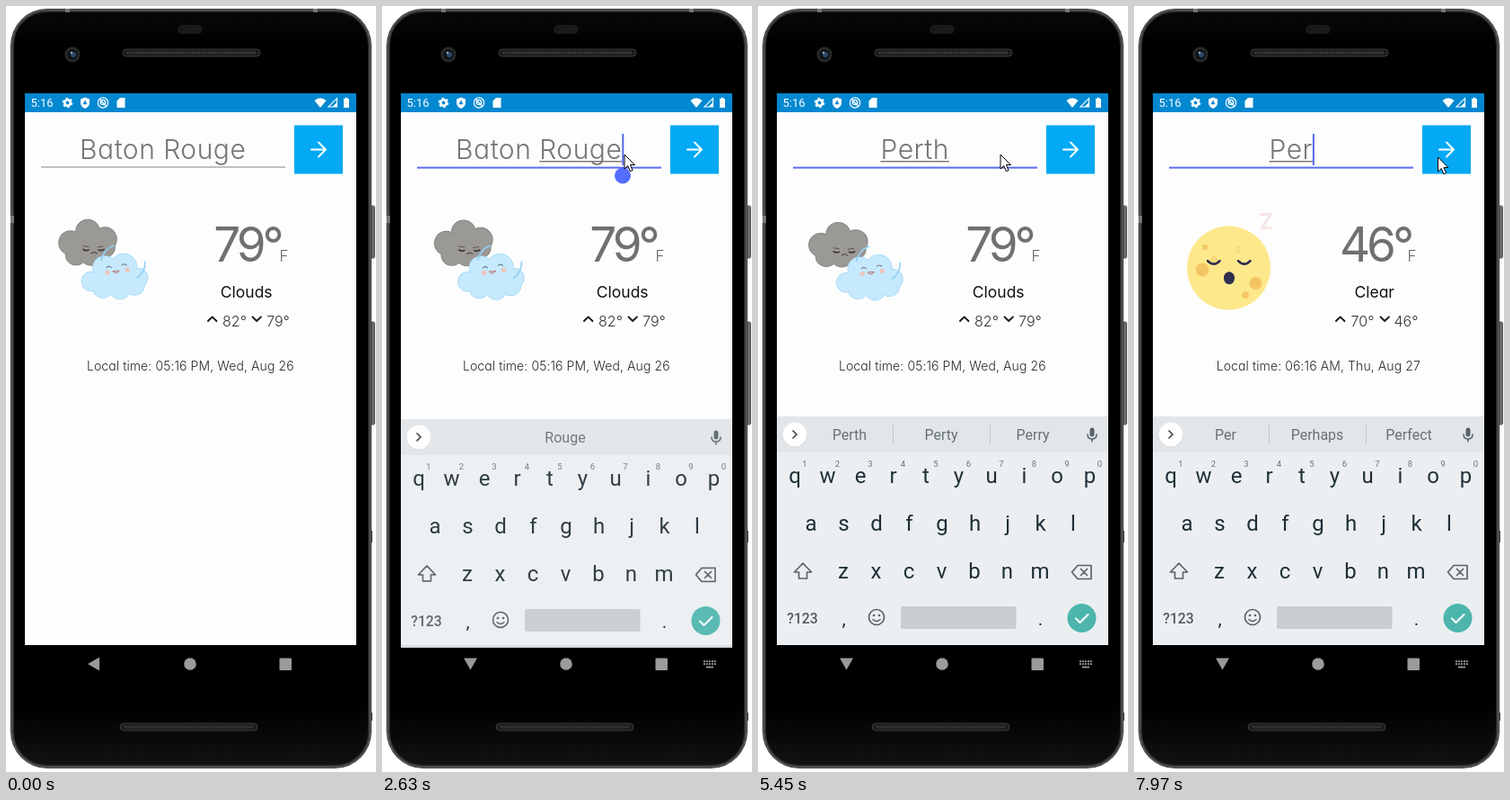
An HTML page for the animation above (7990 ms loop, 412 by 851 pixels).

```html
<!DOCTYPE html>
<html lang="en">
<head>
<meta charset="utf-8">
<title>Weather search</title>
<style>
html, body { margin: 0; width: 100%; height: 100%; overflow: hidden; background: #fff; }
svg { display: block; width: 100%; height: 100%; }
text { font-family: Inter, Lato, sans-serif; font-feature-settings: "cv11"; text-anchor: middle; white-space: pre; }
.kb text, .clock { font-family: Roboto, sans-serif; }
.line { fill: none; stroke-linecap: round; stroke-linejoin: round; }
</style>
</head>
<body>
<svg id="stage" viewBox="0 0 412 851" xmlns="http://www.w3.org/2000/svg"></svg>
<script>
const LOOP = 7990, FOCUS = 2200, WEATHER = 6350;

const text = (x, y, s, size, fill, extra = '') =>
  `<text x="${x}" y="${y}" font-size="${size}" fill="${fill}" ${extra}>${s}</text>`;
const rect = (x, y, w, h, fill, r = 0, extra = '') =>
  `<rect x="${x}" y="${y}" width="${w}" height="${h}" rx="${r}" fill="${fill}" ${extra}/>`;
const circle = (x, y, r, fill, extra = '') =>
  `<circle cx="${x}" cy="${y}" r="${r}" fill="${fill}" ${extra}/>`;
const line = (d, stroke, width = 1.5, extra = '') =>
  `<path class="line" d="${d}" stroke="${stroke}" stroke-width="${width}" ${extra}/>`;
const shape = (d, fill) => `<path d="${d}" fill="${fill}"/>`;

// Puffs are outlined first, then filled, so only the outer edge shows.
const cloud = (puffs, fill, edge) => {
  const all = puffs.map(p => circle(...p, fill)).join('');
  return `<g stroke="${edge}" stroke-width="1.6">${all}</g>${all}`;
};

const grille = (x, y) => rect(x, y, 153, 8, '#1c1c1c', 4, 'stroke="#3c3c3c"') +
  `<path d="M${x + 5} ${y + 4}h143" stroke="#444" stroke-width="3" stroke-dasharray="1 1"/>`;
const sideButton = (y, h) => rect(406, y, 4.5, h, '#6a6c6e', 1.5, 'stroke="#3a3a3a" stroke-width=".8"');

const phone = `
  <defs>
    <linearGradient id="shade" x1="0" x2="0" y1="0" y2="1">
      <stop offset="0" stop-color="#080808"/><stop offset=".04" stop-color="#000"/>
      <stop offset=".92" stop-color="#000"/><stop offset="1" stop-color="#121212"/>
    </linearGradient>
  </defs>
  ${sideButton(222, 58)}${sideButton(351, 114)}
  ${rect(405, 583, 3, 13, '#555')}${rect(405, 785, 3, 9, '#555')}
  ${rect(5, 3, 402, 844, '#2e3032', 41)}
  ${rect(6.5, 4.5, 399, 841, 'none', 39, 'stroke="#6b6e70" stroke-width="1"')}
  ${rect(9, 7, 394, 836, 'url(#shade)', 36)}
  ${rect(5, 233, 4, 8, '#777')}${rect(66, 3, 5, 4, '#777')}${rect(342, 3, 5, 4, '#777')}
  ${rect(191, 21, 28, 10, '#191919', 5)}
  ${grille(130, 48)}${grille(127, 797)}
  ${circle(74, 54, 8.5, '#2b2b2b')}${circle(74, 54, 6, '#11151a')}${circle(75, 54, 3, '#2e4a66')}${circle(73, 52, 1.2, '#8fb0c8')}
  ${rect(21, 97, 369, 21, '#0288d1')}${rect(21, 118, 369, 592, '#fdfdfd')}`;

const status = `
  ${text(40, 112, '5:16', 13, '#fff', 'class="clock"')}
  <g fill="none" stroke="#fff">
    <circle cx="68.5" cy="107.5" r="3.2" stroke-width="2.6"/>
    <circle cx="68.5" cy="107.5" r="4.8" stroke-width="2" stroke-dasharray="2.5 2.5"/>
    <circle cx="108" cy="107.5" r="5.6" stroke-width="1.2"/>
    <circle cx="108" cy="107" r="2.6" stroke-width="1.4"/>
    <path d="M104.5 103.5l7 8" stroke-width="1.2"/>
    <path d="M368.5 102.5v9.5h-9.5z" stroke-width="1.1"/>
  </g>
  ${shape('M88 101.5l5 2v4q0 4-5 6.5q-5-2.5-5-6.5v-4z', '#fff')}
  ${shape('M88 104.5l2.6 4.8h-5.2z', '#0288d1')}
  ${shape('M127 102h5.5v11h-9v-7.5z', '#fff')}
  ${shape('M350 113l-6.5-8q6.5-5.5 13 0z', '#fff')}
  ${shape('M368.5 107v5h-5z', '#fff')}
  ${shape('M376 103h1.7v-1.3h2.6v1.3h1.7v10h-6z', '#fff')}`;

const clouds = `<g id="clouds">
  <g id="gray">
    ${cloud([[72, 263, 13], [91, 250.5, 13], [110, 259, 13], [78, 276, 11.5], [95, 276, 12], [110, 268, 11], [92, 264, 16]], '#9b9996', '#82807d')}
    ${line('M86 266.5l6 1M102 268l6-1', '#5d5653', 1.1)}
    ${line('M86 270.5q3 2 6 .5M103 271q3 1.5 6-.5', '#3d3634', 1.7)}
    ${line('M95 275q3-3 6 0', '#4d4643', 1.2)}
  </g>
  <g id="blue">
    ${cloud([[95, 306, 10.5], [110, 291, 13], [131, 290, 14.5], [147, 302, 10.5], [108, 313, 11], [127, 314.5, 11], [143, 310, 11], [121, 303, 16]], '#c6e9fd', '#a3d9f7')}
    ${line('M106 282q4-13 14-16M146 302q9-6 9-18', '#93d0f4', 1.7)}
    ${circle(113, 296, 2.6, '#f0c3b8')}${circle(135, 293, 2.6, '#f0c3b8')}
    ${line('M112 290.5q2.5-2.5 5 0M129 288q2.5-2.5 5 0', '#6f7d88', 1.1)}
    ${line('M119 295q3.5 4 7-.5z', '#b57268', 1)}
  </g>
</g>`;

const moon = `<g id="moon">
  ${circle(105.5, 291, 46.5, '#fde98c')}
  <g fill-opacity=".85">
    ${circle(76, 293, 7.5, '#f2bf5c')}${circle(135.5, 308, 7, '#f2bf5c')}${circle(124, 321, 4, '#f2bf5c')}
    ${circle(79, 268, 3, '#f2bf5c')}${circle(89, 282, 4, '#f7d375')}
  </g>
  <g id="eyes">${line('M82 283q7 7 13.5 0M116 283q7 7 13.5 0', '#2f2f52', 2.6)}</g>
  <ellipse id="mouth" cx="106" fill="#2f2f52"/>
  ${[0, 1].map(i => text(0, 0, 'Z', 10, '#dc5f63', `id="z${i}" font-weight="700"`)).join('')}
</g>`;

const app = `
  ${text(174.7, 170, '', 30, '#757575', 'id="field" font-weight="300" letter-spacing=".5"')}
  <rect id="word" y="172" height="1.4" fill="#757575"/>
  <rect id="rule" x="39" width="272"/>
  <rect id="caret" y="142" width="2" height="35" fill="#5468ee"/>
  ${circle(268, 188.5, 9, '#536dfe', 'id="handle"')}
  ${rect(321, 132.5, 54, 54, '#03a9f4')}
  ${line('M340 159.5h16M348 151.5l8 8-8 8', '#fff', 2)}
  ${clouds}${moon}
  ${text(268.5, 284, '', 53, '#707070', 'id="temp" font-weight="400" letter-spacing="-4"')}
  ${text(309.5, 284, 'F', 17, '#666', 'font-weight="300"')}
  ${text(267.7, 324, '', 17.5, '#111', 'id="sky" font-weight="400"')}
  ${line('M225 350l4.7-4.7 4.7 4.7M274.5 345.3l4.7 4.7 4.7-4.7', '#111', 1.8)}
  ${text(254.5, 356, '', 16, '#333', 'id="high" font-weight="300"')}
  ${text(303, 356, '', 16, '#333', 'id="low" font-weight="300"')}
  ${text(205.3, 405, '', 14, '#2a2a2a', 'id="local" font-weight="300" letter-spacing=".1"')}`;

const ink = '#1f2f37', soft = '#58646a';
const keyRow = (letters, x, y) => [...letters].map((c, i) =>
  text(x + i * 36.5, y, c, 24, ink, 'class="key"')).join('');

const keyboard = `<g id="kb" class="kb">
  ${rect(21, 456, 369, 254, '#eceff2')}${rect(21, 456, 369, 40, '#e2e6e9')}
  ${circle(41, 476.5, 14, '#d3d7da')}${circle(41, 476, 13.5, '#fff')}
  ${line('M39 472l4 4-4 4', '#444', 1.7)}
  ${[102, 204, 306].map(x => text(x, 482, '', 16, '#667176', 'class="hint"')).join('')}
  <path id="bars" d="M150.5 465v22M258.5 465v22" stroke="#c3c8cb"/>
  ${rect(369.5, 468.5, 5, 10, soft, 2.5)}${line('M367 476q0 5 5 5t5-5M372 481v3', soft)}
  ${keyRow('qwertyuiop', 41, 530)}${keyRow('asdfghjkl', 59, 583)}${keyRow('zxcvbnm', 95, 636)}
  ${[...'1234567890'].map((c, i) => text(52 + i * 36.5, 512, c, 9.5, '#66737a')).join('')}
  ${line('M50 619l9.5 10h-5v7h-9v-7h-5z', soft, 1.7, 'id="shift"')}
  ${line('M356 621.5h15v15h-15l-6.5-7.5zM359.5 625.5l7 7M366.5 625.5l-7 7', soft, 1.7)}
  ${text(49.5, 686, '?123', 15.7, '#4f5d64', 'font-weight="500"')}
  ${text(95.5, 688, ',', 21, ink)}${text(314.5, 688, '.', 21, ink)}
  ${circle(132, 679, 8.5, 'none', `stroke="${soft}" stroke-width="1.7"`)}
  ${circle(129, 677, 1.3, soft)}${circle(135, 677, 1.3, soft)}${line('M128 681.5q4 4 8 0', soft)}
  ${rect(159, 667, 128.5, 25, '#c9cdd0', 2)}
  ${circle(360.5, 680, 16, '#4db6ac')}${line('M354 680.5l4.5 4.5 9-9', '#fff', 2)}
</g>`;

const gray = '#9a9a9a';
const nav = `
  <g id="back">${shape('M91 731l13-7.5v15z', gray)}</g>
  <g id="down">${shape('M91 724.5h15l-7.5 13z', gray)}
    <path d="M358 728h14M358 731h14" stroke="${gray}" stroke-width="1.8" stroke-dasharray="1.8 1.2"/>
    <path d="M361 734.5h8" stroke="${gray}" stroke-width="1.8"/></g>
  ${circle(205, 731, 6.8, gray)}${rect(304.5, 724.5, 13.5, 13.5, gray, 1)}`;

const pointer = `<path id="pointer" d="M0 0v16l3.7-3.5 2.7 6.2 2.7-1.2-2.7-6h5z" fill="#fff" stroke="#000" stroke-linejoin="round"/>`;

stage.innerHTML = phone + status + app + keyboard + nav + pointer;

const $ = id => document.getElementById(id);
const set = (id, attrs) => { for (const k in attrs) $(id).setAttribute(k, attrs[k]); };
const show = (id, on) => set(id, { visibility: on ? 'visible' : 'hidden' });
const put = (el, s) => { if (el.textContent !== s) el.textContent = s; };
const clamp = v => Math.max(0, Math.min(1, v));
const mix = (a, b, k) => a + (b - a) * k;

// Text of the search field: hold backspace, type, then two more deletions.
const city = 'Baton Rouge', next = 'Perth';
const edits = [[0, city], [FOCUS, city], [2900, city.slice(0, -1)]];
for (let n = city.length - 2; n >= 0; n--) edits.push([3800 - n * 50, city.slice(0, n)]);
[4200, 4380, 4520, 4660, 4800].forEach((t, i) => edits.push([t, next.slice(0, i + 1)]));
edits.push([7430, 'Pert'], [7760, 'Per']);
const editAt = t => edits.filter(e => e[0] <= t).pop() || edits[0];

const hints = {
  P: ['P', 'Please', 'Pm'], Pe: ['Pe', 'People', 'Per'], Per: ['Per', 'Perhaps', 'Perfect'],
  Pert: ['Pert', 'Perth', 'Perry'], Perth: ['Perth', 'Perty', 'Perry']
};
const lastWord = s => s.split(' ').pop();

const path = [[250, 334, 852], [850, 272, 468], [1200, 268, 280], [1390, 265, 215], [1600, 270, 165],
  [5480, 270, 165], [5770, 334, 172], [5950, 338.5, 168]];
function pointerAt(t) {
  const i = path.findIndex(p => p[0] > t);
  if (i < 0) return path[path.length - 1].slice(1);
  if (i === 0) return path[0].slice(1);
  const [a, b] = [path[i - 1], path[i]], k = (t - a[0]) / (b[0] - a[0]);
  return [mix(a[1], b[1], k), mix(a[2], b[2], k)];
}

function drawField(t) {
  const focused = t >= FOCUS, [since, value] = editAt(t), word = lastWord(value);
  put($('field'), value);
  const width = value ? $('field').getComputedTextLength() : 0, end = 174.7 + width / 2;
  const start = word ? $('field').getStartPositionOfChar(value.length - word.length).x : end;
  set('word', { x: start, width: end - start });
  show('word', focused && word);
  set('rule', { y: focused ? 178.6 : 178.5, height: focused ? 2 : 1, fill: focused ? '#5b6cf0' : '#858585' });
  set('caret', { x: end });
  show('caret', focused && (t - since) % 1000 < 500);
  show('handle', focused && t < 2900);
}

function drawKeyboard(t) {
  const slide = clamp((t - 2520) / 267);
  set('kb', { transform: `translate(0 ${43 * (1 - slide) ** 5})`, opacity: clamp((t - 2520) / 120) });
  const upper = t >= 3800 && t < 4200;
  document.querySelectorAll('.key').forEach(k =>
    put(k, upper ? k.textContent.toUpperCase() : k.textContent.toLowerCase()));
  $('shift').style.fill = upper ? soft : 'none';
  const word = lastWord(editAt(t - 100)[1]), list = hints[word] || ['', word, ''];
  document.querySelectorAll('.hint').forEach((h, i) => put(h, list[i]));
  set('bars', { opacity: list[0] ? 1 : 0 });
  show('back', t < 2420);
  show('down', t >= 2420);
}

function drawClouds(t) {
  const a = t / 2435 * 2 * Math.PI, side = Math.min(1, 1 - Math.cos(a));
  const drop = 2.5 * Math.sin(a) ** 2, squash = .5 - .5 * Math.cos(a);
  set('gray', { transform: `translate(${91 - 1.8 * side} ${262 + drop}) scale(${1 + .03 * squash} ${1 - .07 * squash}) translate(-91 -262)` });
  set('blue', { transform: `translate(${3.6 * side} ${drop * .5})` });
}

function drawMoon(t) {
  const phase = offset => ((t - 7970) / 2000 + offset + 10) % 1;
  const v = phase(.05), w = phase(.95), open = .5 - .5 * Math.cos(2 * Math.PI * v);
  const fade = k => clamp(2.2 * Math.sin(Math.PI * k) - .2);
  set('eyes', { transform: `translate(0 ${4.5 * open})` });
  set('mouth', { cy: 302 + 8 * open, rx: 6 + 1.3 * open, ry: 7 + 2.5 * open });
  set('z0', { x: 116 + 11 * v, y: 275 - 11 * v, 'font-size': 9 + 10 * v, opacity: fade(v) });
  set('z1', { x: 130.5 + 17.5 * w, y: 266 - 19 * w, 'font-size': 19 + 6 * w, opacity: fade(w) });
}

function drawWeather(t) {
  const perth = t >= WEATHER;
  const values = perth
    ? { temp: '46°', sky: 'Clear', high: '70°', low: '46°', local: 'Local time: 06:16 AM, Thu, Aug 27' }
    : { temp: '79°', sky: 'Clouds', high: '82°', low: '79°', local: 'Local time: 05:16 PM, Wed, Aug 26' };
  for (const id in values) put($(id), values[id]);
  show('clouds', !perth);
  show('moon', perth);
  perth ? drawMoon(t) : drawClouds(t);
}

function frame() {
  const t = performance.now() % LOOP;
  drawField(t);
  drawKeyboard(t);
  drawWeather(t);
  set('pointer', { transform: `translate(${pointerAt(t)})` });
  requestAnimationFrame(frame);
}
frame();
</script>
</body>
</html>
```
